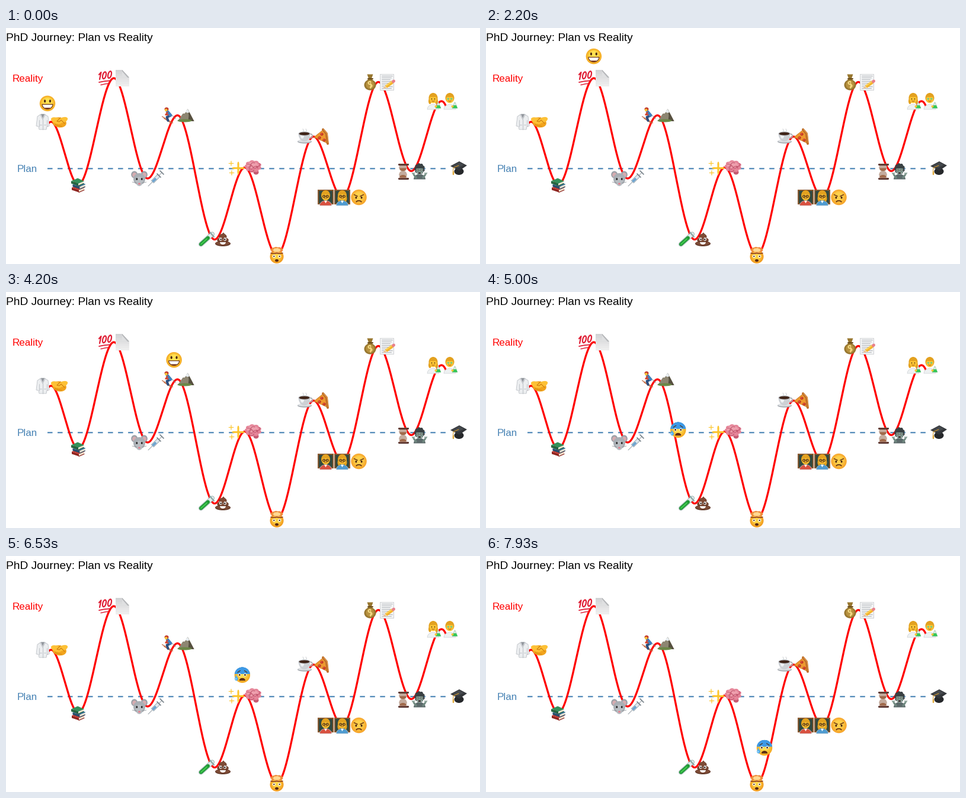
Animation of 800 by 400 pixels, one loop 8000 ms. Source, as a matplotlib script:

```python
import numpy as np
import matplotlib.pyplot as plt
from matplotlib.animation import FuncAnimation
from matplotlib.colors import to_rgb
from matplotlib.lines import Line2D
from matplotlib.patches import Ellipse, Polygon
from matplotlib.transforms import Affine2D

W, H = 800, 400
FRAMES, LOOP = 120, 8000
PX = 0.72  # points per pixel at 100 dpi
START, STEP, LIFT = 70, 3.39, 37
CELL = 28  # width of one sticker
PLAN = "#4682b4"
SKIN, HAIR, DARK = "#fcc534", "#e3a11f", "#4b2813"

fig = plt.figure(figsize=(W / 100, H / 100), dpi=100, facecolor="white")
ax = fig.add_axes([0, 0, 1, 1])
ax.set_xlim(0, W)
ax.set_ylim(H, 0)
ax.axis("off")


def mix(a, b, f):
    return tuple(np.array(to_rgb(a)) * (1 - f) + np.array(to_rgb(b)) * f)


class Sticker:
    """A small drawing in pixel units around its own centre."""

    def __init__(self, x=0, y=0, z=3):
        self.shift = Affine2D().translate(x, y)
        self.z = z
        self.parts = []

    def add(self, art):
        art.set_transform(self.shift + ax.transData)
        art.set_zorder(self.z)
        ax.add_artist(art)
        self.parts.append(art)

    def poly(self, color, *xy, edge="none", lw=0.8, alpha=1):
        self.add(Polygon(np.reshape(xy, (-1, 2)), fc=color, ec=edge, lw=lw * PX, alpha=alpha))

    def mirror(self, color, *xy, **kw):
        """Shape given by its right half."""
        right = np.reshape(xy, (-1, 2))
        self.poly(color, *np.vstack([right, right[::-1] * [-1, 1]]).ravel(), **kw)

    def box(self, color, x, y, w, h, **kw):
        self.poly(color, x - w / 2, y - h / 2, x + w / 2, y - h / 2,
                  x + w / 2, y + h / 2, x - w / 2, y + h / 2, **kw)

    def oval(self, color, x, y, w, h, angle=0, edge="none", lw=0.8):
        self.add(Ellipse((x, y), w, h, angle=angle, fc=color, ec=edge, lw=lw * PX))

    def pair(self, color, dx, y, w, h, **kw):
        for side in (-1, 1):
            self.oval(color, dx * side, y, w, h, **kw)

    def line(self, color, lw, *xy, cap="round"):
        p = np.reshape(xy, (-1, 2))
        self.add(Line2D(p[:, 0], p[:, 1], color=color, lw=lw * PX, solid_capstyle=cap))

    def polar(self, color, x, y, w, h, radius, **kw):
        """Closed shape with the radius given as a function of the angle."""
        a = np.linspace(0, 2 * np.pi, 80, endpoint=False)
        r = radius(a)
        self.poly(color, *np.c_[x + w / 2 * r * np.cos(a), y + h / 2 * r * np.sin(a)].ravel(), **kw)

    def cloud(self, color, x, y, w, h, lobes):
        self.polar(color, x, y, w, h, lambda a: 0.86 + 0.14 * abs(np.sin(lobes * a / 2)))

    def arc(self, color, lw, x, y, w, h, a0, a1, fill=None):
        a = np.radians(np.linspace(a0, a1, 16))
        xy = np.c_[x + w / 2 * np.cos(a), y + h / 2 * np.sin(a)].ravel()
        if fill:
            self.poly(fill, *xy, edge=color, lw=lw)
        else:
            self.line(color, lw, *xy)

    def ball(self, outer, inner, y=0, r=13.2, n=6):
        for f in np.linspace(0, 1, n):
            d = 2 * r * (1 - 0.5 * f)
            self.oval(mix(outer, inner, f), 0, y - 0.15 * r * f, d, d)

    def show(self, on):
        for art in self.parts:
            art.set_visible(on)


def coat(s):
    grey = "#bcc0c5"
    s.mirror("#eceef0", 3, -13, 9, -9, 11, 7, 7, 8, 6, 13, edge=grey)
    s.mirror("#92979d", 3, -13, 0, -6)
    s.line(grey, 1, -4, -12, 0, -4, 4, -12)
    s.line(grey, 1, 0, -4, 0, 13)
    for side in (-1, 1):
        s.line(grey, 0.9, 6.5 * side, -3, 6.5 * side, 8)
        s.line(grey, 0.9, 2 * side, 5, 5 * side, 5)


def handshake(s):
    s.oval("#f2a41c", 0, 1, 24, 17, 12)
    s.oval("#fdc136", -5, -2, 19, 10, 20)
    s.oval("#fdc136", 6, -3, 17, 9, -20)
    s.line("#c9780d", 1, 2, -7, -4, -1, 0, 0, 3, -3, 9, 3)
    for k in range(4):
        s.line("#cf820e", 0.9, -7 + 3 * k, 4 + k, -5 + 3 * k, 6.5 + k / 2)


def books(s):
    for k, color in enumerate(("#cc342c", "#38719a", "#35905a")):
        y, dx = 5 - 5.5 * k, (0, 1.5, -1)[k]
        side = mix(color, "black", 0.3)
        s.poly(side, -11 + dx, y, 1 + dx, y + 4, 1 + dx, y + 8, -11 + dx, y + 4)
        s.poly("#efe6d2", 1 + dx, y + 4, 10 + dx, y, 10 + dx, y + 4, 1 + dx, y + 8)
        s.poly(color, -11 + dx, y, dx, y - 5, 11 + dx, y, 1 + dx, y + 4)
        s.line(side, 1.2, 1 + dx, y + 8, 10 + dx, y + 4)


def hundred(s):
    red = "#e01f36"
    s.line(red, 2.2, -11, -6, -7.5, -10, -10, 2)
    for x in (-2, 7):
        s.oval("none", x, -5 - x / 8, 5.4, 12, 15, edge=red, lw=2.2)
    for k in range(2):
        s.line(red, 1.8 - k / 3, -11 + 3 * k, 7 + 4.5 * k, -2 + 2 * k, 5.2 + 4.5 * k, 9 - 4 * k, 4.2 + 5 * k)


def page(s):
    for f in np.linspace(0, 1, 8):
        s.box(mix("#d2d3d5", "#eeeeee", f), 0, -12 + 24 * f, 23, 4.2)
    s.poly("white", 0, -14.5, 12.5, -14.5, 12.5, -1)
    for f in np.linspace(0, 1, 6):
        s.poly(mix("#a3a5a8", "#dfe0e1", f), 0, -14 + 3 * f, 11.5 - 3 * f, -1, 0, -1)


def mouse(s):
    s.pair("#9ba1a8", 8.3, -6.5, 11, 12)
    s.pair("#d6acb0", 8.3, -6, 7, 8)
    s.oval("#a9afb5", 0, 1, 20, 20)
    s.oval("#b9bec3", 0, 5, 12, 16)
    s.pair("#22201f", 4.2, 1, 2.8, 3.6)
    for side in (-1, 1):
        s.line("#777c82", 0.6, 4 * side, 8, 12 * side, 6)
    s.oval("#e2808d", 0, 9, 4, 3)


def syringe(s):
    s.line("#8e979e", 0.9, -13, 13, 10, -10)
    s.line("#9da8b0", 6.5, -6, 6, 5, -5, cap="butt")
    s.line("#dfe8ee", 4.5, -5.5, 5.5, 4.5, -4.5, cap="butt")
    s.line("#6fa5cf", 4, -5.5, 5.5, 0, 0, cap="butt")
    for d in (0, 5):
        s.line("#78828a", 1.7, 2 + d, -8 - d, 8 + d, -2 - d)


def skier(s):
    for d in (0, 3):
        s.line("#c2653c", 1.2, -12 + d, 2 + d, 6 - d, 13)
    s.line("#83898f", 0.8, 2, -3, 11, 6)
    s.line("#2b4e7e", 4, 1, 1, -4, 3, -2, 9)
    s.line("#3f80bd", 5.5, -3, -6, 2, 0)
    s.line("#d6442e", 2.4, -3, -5, -6, -1, -2, -1)
    s.oval("#c23b2c", -4.5, -10.5, 7, 6)
    s.oval(SKIN, -5.3, -8.8, 4.5, 4.5)


def mountain(s):
    s.poly("#8d8672", -14, 10, -5, -3, -2, -3, 3, -11, 14, 10)
    s.poly("#575040", 3, -11, 14, 10, 4, 10, 5, 0)
    s.poly("#e9eef2", 3, -11, 6, -5, 3, -4, 1, -5, -1, -5)
    s.oval("#6b8747", -2, 9, 24, 5)


def tube(s):
    for color, width, end in (("#9fb3b2", 8, 10), ("#e3efee", 6, 10), ("#1f9a35", 6, 3), ("#46cc52", 2, 1)):
        s.line(color, width, -9, 8, end, 8 - 0.9 * (end + 9))
    s.line("#8aa3a3", 2.2, 6, -12.5, 13, -4.5)


def poop(s):
    s.poly("#7b4a35", -3, -8, 1, -12, 5, -7)
    for k in range(3):
        w, y = 26 - 6.5 * k, 7 - 6 * k
        s.oval("#5d3425", 0, y, w, 9)
        s.oval("#7d4b36", 0, y - 0.7, w - 1.5, 7.5)
    s.pair("white", 3.6, -0.5, 4.6, 5.6)
    s.pair("#22150f", 3.3, -0.2, 2.3, 3)
    s.arc("none", 0, 0, 4.5, 10, 8, 0, 180, fill="white")


def sparkles(s):
    for x, y, r in ((3, 1, 22), (-9, -7, 9), (-8, 9, 9)):
        s.polar("#fcc62f", x, y, r, r, lambda a: 0.25 + 0.75 * abs(np.cos(2 * a)) ** 6)


def brain(s):
    s.oval("#c65a72", 5, 8, 9, 8)
    s.cloud("#e58599", 0, -2, 29, 21, 9)
    s.oval("#ee9fad", -1, -4, 19, 11)
    for k in range(7):
        a = 2.4 * k
        r = 3 + 1.2 * k
        s.arc("#bd5069", 1, r * np.cos(a), -2 + 0.6 * r * np.sin(a), 8, 6, 60 * k, 60 * k + 190)


def mind_blown(s):
    s.ball("#f29b1f", "#ffd546", 2.5, 11.5)
    s.cloud("#ef8d3c", 0, -9, 22, 10, 9)
    s.cloud("#ffd991", 0, -8.5, 13, 7, 7)
    s.box("#f6b35d", 0, -4, 8, 4)
    s.line("#8a3b1c", 1.6, -10, -3.5, -5, -2.5, 0, -3.5, 5, -2.5, 10, -3.5)
    s.pair("white", 4.7, 2, 5, 5)
    s.pair(DARK, 4.7, 2, 2.4, 2.4)
    s.oval("#5b2a13", 0, 9, 6, 4.4)


def coffee(s):
    s.oval("#a9aeb4", -1, 8.5, 24, 6.5)
    s.oval("#dfe2e5", -1, 7.3, 23, 5)
    s.oval("none", 8.5, -1, 7, 7, edge="#a9afb5", lw=1.8)
    s.arc("none", 0, -1.5, -5, 20, 27, 0, 180, fill="#cdd1d5")
    s.oval("#eff1f3", -5, -1, 6, 9)
    s.oval("#b3b8bd", -1.5, -5, 20, 7)
    s.oval("#3f2418", -1.5, -4.8, 17.5, 5)
    for x in (-4, 1):
        s.line("#cfd3d6", 1, x, -8, x + 1.5, -10, x, -13)


def pizza(s):
    s.poly("#ee9a2f", -13, 1, 3, -12, 11, 12, edge="#c9741f")
    s.line("#bd6c27", 4, 2, -12, 8, -5, 10, 12)
    s.line("#e09d4d", 1.2, 3, -12, 9, -5, 11, 11)
    for x, y in ((0, -4), (-4, 2), (4, 6)):
        s.oval("#c03423", x, y, 5.4, 5)
        s.oval("#da5136", x - 0.5, y - 0.5, 3, 3)


def person(s, shirt, long, y=-2):
    s.arc("#c9cdd1", 0.6, 0, 14, 20, 17, 180, 360, fill=shirt)
    s.oval(HAIR, 0, y - 1.5, 15, 17)
    if long:
        s.pair(HAIR, 5.5, y + 4, 5, 10)
    s.oval(SKIN, 0, y + 0.5, 12, 13.5)
    s.arc(HAIR, 0.5, 0, y - 1.5, 13, 13, 195, 345, fill=HAIR)
    s.pair(DARK, 2.5, y + 0.3, 1.6, 2)
    s.arc("#9c5318", 0.9, 0, y + 3, 4.4, 2.6, 10, 170)


def teacher(s, shirt, long):
    s.box("#32493f", 0, -1, 25, 23, edge="#8b5b32", lw=2)
    person(s, shirt, long)
    s.pair("none", 2.8, -1.6, 4.4, 4, edge=DARK, lw=1)
    s.mirror("white", 2.5, 6, 0, 10)


def red_teacher(s):
    teacher(s, "#d8503f", False)


def blue_teacher(s):
    teacher(s, "#4f9bd0", True)


def scientist(s, long):
    person(s, "#eef1f2", long, -4)
    s.poly("#dceee2", 8, 2, 9, 2, 13, 12, 4, 12, edge="#a9c7b3")
    s.poly("#35c75a", 6, 7, 11, 7, 13, 12, 4, 12)
    s.oval(SKIN, 4.5, 9, 4, 3.6)


def woman_scientist(s):
    scientist(s, True)


def man_scientist(s):
    scientist(s, False)
    s.pair("#6fce86", 2.7, -4, 3.6, 3)


def angry(s):
    s.ball("#f6a52c", "#ffd04a")
    s.pair(DARK, 4.6, 0.5, 3, 3.8)
    for side in (-1, 1):
        s.line("#6a3613", 1.5, 8 * side, -4.5, 2.2 * side, -1.8)
    s.arc("#5c2d12", 1.7, 0, 8.5, 9, 5.5, 200, 340)


def money_bag(s):
    s.oval("#98772f", 0, 5, 20, 18)
    s.mirror("#98772f", 5, -13, 2.5, -6, 7, 0)
    s.oval("#b8923f", 0, 4.5, 14, 14)
    s.line("#694b1b", 2, -4, -6, 4, -6)
    for side in (-1, 1):
        s.arc("#f8e089", 1.8, 0, 4 + 2.4 * side, 6, 4.8, 90 - 180 * (side < 0), -90 - 240 * (side < 0) + 40)
    s.line("#f8e089", 1.2, 0, -1.5, 0, 10)


def memo(s):
    s.box("#f3f4f5", 0, 0, 23, 27, edge="#c8cacd")
    for k in range(8):
        s.line("#9fa5ab", 0.8, -9, -11 + 3 * k, 9 - 2 * (k % 3), -11 + 3 * k)
    s.line("#eec899", 3, -4, 10, 0, 7)
    s.line("#f4b52d", 5.4, -1, 8, 10, 0, cap="butt")
    s.line("#fcd762", 1.6, -2, 7, 9, -1, cap="butt")
    s.line("#e9808a", 5, 11, -0.7, 12, -1.5)


def hourglass(s):
    s.pair("#c4ab9d", 0, -6, 13, 13)
    s.pair("#c4ab9d", 0, 6, 13, 13)
    s.arc("none", 0, 0, -5, 11, 10, 0, 180, fill="#a0694a")
    s.arc("none", 0, 0, 11, 12, 9, 180, 360, fill="#a0694a")
    for y in (-12, 12):
        s.line("#54302a", 3.2, -7.5, y, 7.5, y)
        s.line("#8a5a4d", 1, -7, y - 0.6, 7, y - 0.6)


def zombie(s):
    s.arc("none", 0, 0, 14, 20, 18, 180, 360, fill="#5c6a6b")
    s.cloud("#3a4143", 0, -4, 18, 19, 9)
    s.oval("#87a096", 0, -1, 12, 14)
    s.arc("none", 0, 0, -3, 13, 12, 195, 345, fill="#3a4143")
    s.pair("#3e4844", 2.8, -1.5, 3.8, 3.6)
    s.pair("#e8eadb", 2.8, -1.5, 1.8, 1.8)
    s.oval("#3b2226", 0, 3.3, 4.6, 2.4)
    for side in (-1, 1):
        s.line("#6f887f", 3.2, 6 * side, 11, 9 * side, 7)
        for k in (-2, 0, 2):
            s.line("#7f988e", 1.3, 10 * side, 7, 10.5 * side + k, 3)


def grad_cap(s):
    s.oval("#26282b", 0.5, 5, 16, 12)
    s.poly("#33363a", -14, -4, 1, -12, 14, -5, 1, 4)
    s.poly("#45494d", -11, -4, 1, -10.5, 9, -6, -1, -1)
    s.line("#d79a2b", 1.1, 0, -5, -9, -1, -9.5, 6)
    s.line("#e0a838", 2.5, -9.5, 6, -9.5, 10)


def grin(s):
    s.ball("#f5ab22", "#ffe252")
    s.pair(DARK, 4.4, -4, 3.2, 5)
    s.arc("#6b3413", 1.2, 0, 1.5, 18, 16, 0, 180, fill="white")
    s.arc("none", 0, 0, 4, 12, 11.5, 35, 145, fill="#7a3518")


def anxious(s):
    s.ball("#f5ab22", "#ffdc52")
    for k in range(5):
        s.arc("none", 0, 0, 0, 26.4, 26.4, 188 + 7 * k, 352 - 7 * k, fill=(0.24, 0.6, 0.9, 0.38))
    for side in (-1, 1):
        s.line("#4a3a2c", 1.3, 8 * side, -4.5, 3.5 * side, -7.5)
    s.pair("white", 4.6, -0.5, 4.6, 5)
    s.pair(DARK, 4.6, -0.3, 2.8, 3.2)
    s.arc("#5c2b12", 1, 0, 9, 9, 7, 180, 360, fill="#5c2b12")
    s.poly("#4eaeee", -10.5, 0, -7.3, 6, -12.7, 6)
    s.oval("#4eaeee", -10, 6.5, 5.6, 6)
    s.oval("#c5e8fd", -10.8, 6.5, 1.6, 2.6)


# Turning points of the curve and the stickers placed there
MILESTONES = [
    (76, 159, [coat, handshake]),
    (122, 265.5, [books]),
    (182, 85, [hundred, page]),
    (239, 255, [mouse, syringe]),
    (289.5, 148, [skier, mountain]),
    (352, 358.5, [tube, poop]),
    (403, 236.5, [sparkles, brain]),
    (457, 385, [mind_blown]),
    (519, 184, [coffee, pizza]),
    (567.5, 287, [red_teacher, blue_teacher, angry]),
    (628.5, 91.5, [money_bag, memo]),
    (684, 242.5, [hourglass, zombie]),
    (735, 124, [woman_scientist, man_scientist]),
]
KX, KY = np.array([m[:2] for m in MILESTONES]).T


def height(x):
    """Eased curve from one turning point to the next."""
    i = np.clip(np.searchsorted(KX, x, "right") - 1, 0, len(KX) - 2)
    f = (x - KX[i]) / (KX[i + 1] - KX[i])
    return KY[i] + (KY[i + 1] - KY[i]) * f * f * (3 - 2 * f)


def label(x, y, text, size, color, ha="center"):
    ax.text(x, y, text, size=size * PX, color=color, family="Liberation Sans", ha=ha, va="baseline")


label(0, 21.5, "PhD Journey: Plan vs Reality", 19.2, "black", "left")
label(36.5, 91.5, "Reality", 17, "red")
label(36, 244.3, "Plan", 17, PLAN)

ax.plot([START, 750], [238.3, 238.3], color=PLAN, lw=2.1 * PX, dashes=(4.05, 4.05),
        dash_capstyle="butt", snap=False, zorder=1)
xs = np.linspace(START, 743, 700)
ax.plot(xs, height(xs), color="red", lw=3.3 * PX, zorder=2)

for mx, my, drawings in MILESTONES:
    for k, draw in enumerate(drawings):
        draw(Sticker(mx + CELL * (k - (len(drawings) - 1) / 2), my))
grad_cap(Sticker(764, 238))

happy, worried = Sticker(z=5), Sticker(z=5)
grin(happy)
anxious(worried)


def update(i):
    x = START + STEP * i
    calm = x < 320
    for face, on in ((happy, calm), (worried, not calm)):
        face.show(on)
        face.shift.clear().translate(x, height(x) - LIFT)
    return happy.parts + worried.parts


anim = FuncAnimation(fig, update, frames=FRAMES, interval=LOOP / FRAMES, init_func=lambda: update(0),
                     repeat=True, repeat_delay=0, blit=False)
plt.show()
```
